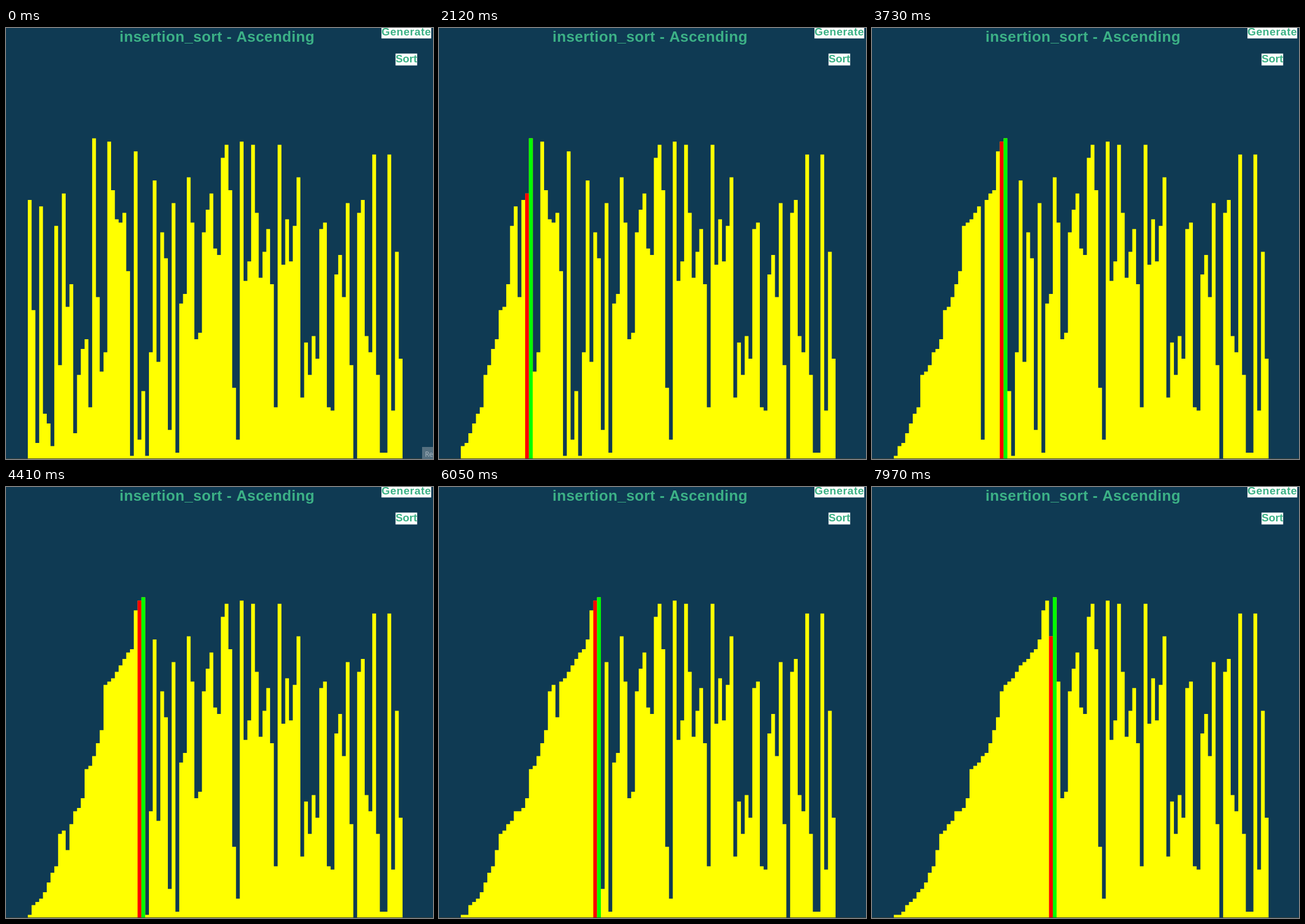
An HTML page with a canvas that plays this animation: 744x752 px, repeating every 8 s.

```html
<!DOCTYPE html>
<html lang="en">
<head>
<meta charset="utf-8">
<title>Insertion sort</title>
<style>
  html, body { margin: 0; width: 100%; height: 100%; overflow: hidden; background: #0f3a53; }
  canvas { display: block; }
</style>
</head>
<body>
<canvas id="stage" width="744" height="752"></canvas>
<script>
const W = 744, H = 752, LOOP = 8000, TICK = 68.7;
const BG = '#0f3a53', BAR = '#ffff00', RED = '#ff0000', GREEN = '#00ff00', MINT = '#3cb186';
const SANS = '"Liberation Sans", Arial, sans-serif';

// The chart is laid out on an 800 x 800 board, shown slightly reduced.
const SCALE = 0.9422, SHIFT_X = -9.1, SHIFT_Y = -1.55;
const BOARD = 800, PAD = 50, BAR_W = 7, UNIT = 6;

// The unsorted numbers on show
const start = [
  80, 46, 5, 78, 14, 11, 4, 72, 29, 82, 47, 54, 8, 26, 34, 37, 16, 99, 50, 27,
  33, 98, 83, 74, 73, 76, 58, 1, 95, 6, 21, 1, 33, 86, 30, 70, 62, 9, 79, 2,
  48, 51, 87, 73, 37, 39, 70, 77, 82, 65, 63, 93, 97, 83, 22, 6, 98, 55, 61, 97,
  76, 56, 64, 71, 54, 16, 97, 60, 74, 61, 72, 87, 19, 36, 26, 38, 31, 71, 73, 16,
  15, 57, 63, 50, 79, 29, 0, 76, 80, 38, 33, 94, 26, 2, 2, 94, 15, 64, 31
];

const ctx = document.getElementById('stage').getContext('2d');
ctx.textAlign = 'center';

// About four swaps per tick after a short wait, quickening slightly.
function swapsAt(tick) {
  return Math.max(0, Math.round(4 * tick - 47 + 3 * (tick / 116) ** 2));
}

// State after a given number of swaps; outer is the index being inserted.
function sortFor(swaps) {
  const list = start.slice();
  let outer = 0, done = 0;
  for (let i = 1; i < list.length && done < swaps; i++) {
    for (let j = i; j > 0 && list[j - 1] > list[j] && done < swaps; j--) {
      [list[j - 1], list[j]] = [list[j], list[j - 1]];
      outer = i;
      done++;
    }
  }
  return { list, outer };
}

function box(x, y, w, h, color) {
  ctx.fillStyle = color;
  ctx.fillRect(x, y, w, h);
}

function label(text, x, y, size, spacing) {
  ctx.font = `bold ${size}px ${SANS}`;
  ctx.letterSpacing = spacing + 'px';
  ctx.fillStyle = MINT;
  ctx.fillText(text, x, y);
}

function button(text, y, width, spacing) {
  box(750 - width / 2, y - 11, width, 22, '#fff');
  label(text, 750, y + 5.4, 20, spacing);
}

// One path per colour keeps neighbouring bars free of seams.
function fillBars(list, color, wanted) {
  ctx.beginPath();
  list.forEach((value, i) => {
    if (wanted(i)) ctx.rect(PAD + BAR_W * i, BOARD - UNIT * value, BAR_W, UNIT * value);
  });
  ctx.fillStyle = color;
  ctx.fill();
}

function drawBars({ list, outer }) {
  fillBars(list, BAR, () => true);
  if (!outer) return;
  fillBars(list, RED, i => i === outer - 1);
  fillBars(list, GREEN, i => i === outer);
}

function drawTip(alpha) {
  if (alpha <= 0) return;
  ctx.globalAlpha = alpha;
  box(725, 731, 19, 21, '#557080');
  ctx.font = '12px "Noto Sans", sans-serif';
  ctx.letterSpacing = '0px';
  ctx.fillStyle = '#a4b3bc';
  ctx.fillText('Re', 737, 748);
  ctx.globalAlpha = 1;
}

function draw(t) {
  const tick = Math.floor(t / TICK + 0.3);
  box(0, 0, W, H, BG);

  ctx.setTransform(SCALE, 0, 0, SCALE, SHIFT_X, SHIFT_Y);
  label('insertion_sort - Ascending', BOARD / 2, 27.1, 27.6, 0.43);
  button('Generate', 10, 92, 0.66);
  button('Sort', 60, 40, 0);
  drawBars(sortFor(swapsAt(tick)));
  ctx.resetTransform();

  box(0, H - 1, W, 1, '#3a4038');
  drawTip(1 - tick / 8);
}

const begin = performance.now();
function loop() {
  draw((performance.now() - begin) % LOOP);
  requestAnimationFrame(loop);
}
loop();
</script>
</body>
</html>
```
